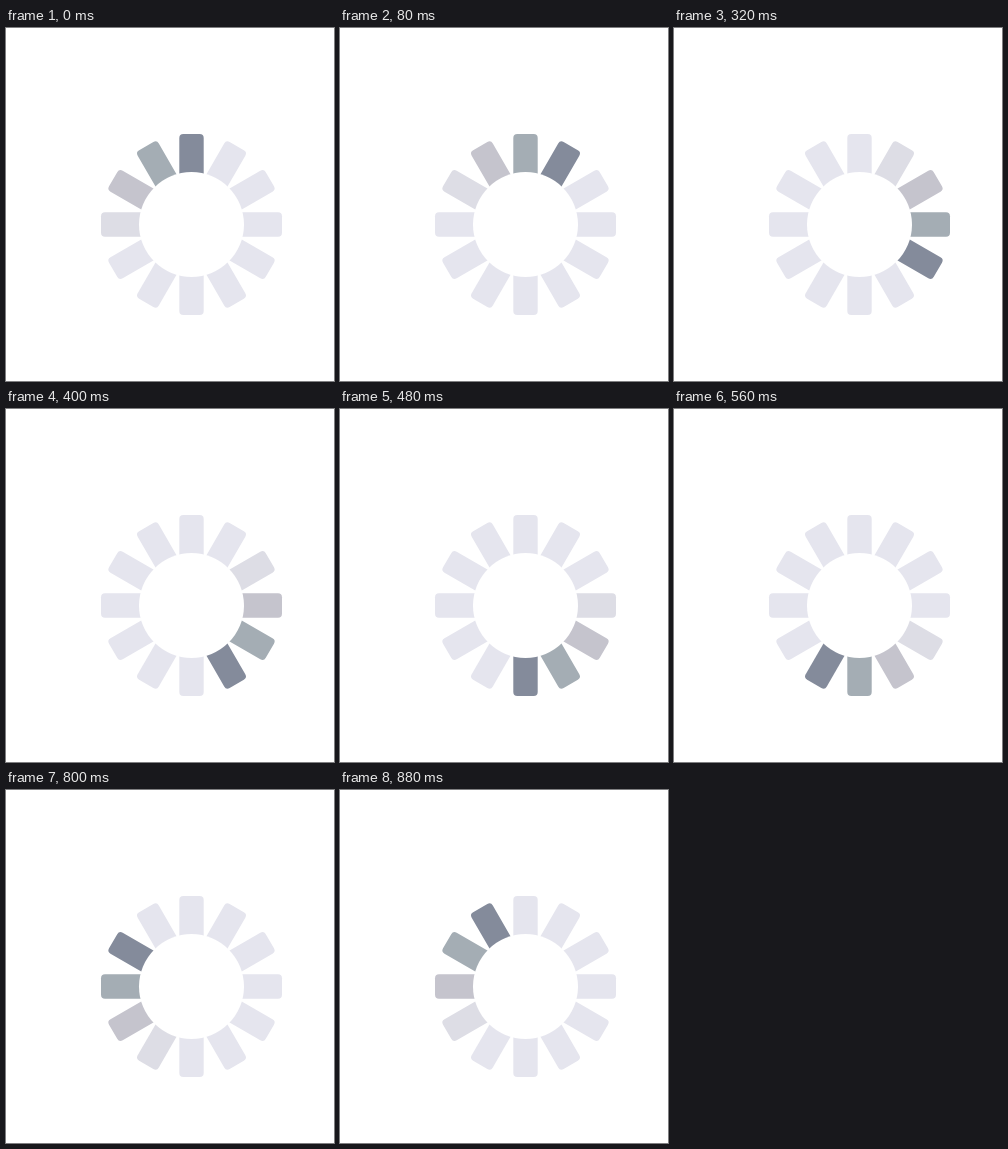
An HTML page with a canvas for the animation above (0.96 s loop, 328 by 353 pixels).

```html
<!DOCTYPE html>
<html lang="en">
<head>
<meta charset="utf-8">
<title>Loading spinner</title>
<style>
  html, body { margin: 0; width: 100%; height: 100%; overflow: hidden; background: #fff; }
  canvas { display: block; }
</style>
</head>
<body>
<canvas id="stage" width="328" height="353"></canvas>
<script>
const ctx = document.getElementById('stage').getContext('2d');
const SPOKES = 12;
const STEP_MS = 80;
const CENTER = { x: 185.5, y: 196.5 };
const OUTER = 90.5;
const HOLE = 52.5;
const WIDTH = 24.4;
const CORNER = 4;
const TRAIL = ['#848b9b', '#a4adb4', '#c5c4cd', '#dddde5'];
const IDLE = '#e5e5ee';

function drawSpoke(index, color) {
  ctx.save();
  ctx.rotate(index * 2 * Math.PI / SPOKES);
  ctx.fillStyle = color;
  ctx.beginPath();
  ctx.roundRect(-WIDTH / 2, -OUTER, WIDTH, OUTER - HOLE + 6, [CORNER, CORNER, 0, 0]);
  ctx.fill();
  ctx.restore();
}

function draw(time) {
  const head = Math.floor(time / STEP_MS) % SPOKES;
  ctx.fillStyle = '#fff';
  ctx.fillRect(0, 0, 328, 353);
  ctx.save();
  ctx.translate(CENTER.x, CENTER.y);
  for (let i = 0; i < SPOKES; i++) {
    const age = (head - i + SPOKES) % SPOKES;
    drawSpoke(i, TRAIL[age] || IDLE);
  }
  ctx.fillStyle = '#fff';
  ctx.beginPath();
  ctx.arc(0, 0, HOLE, 0, 2 * Math.PI);
  ctx.fill();
  ctx.restore();
}

let start;
function tick(now) {
  start ??= now;
  draw(now - start);
  requestAnimationFrame(tick);
}
draw(0);
requestAnimationFrame(tick);
</script>
</body>
</html>
```
